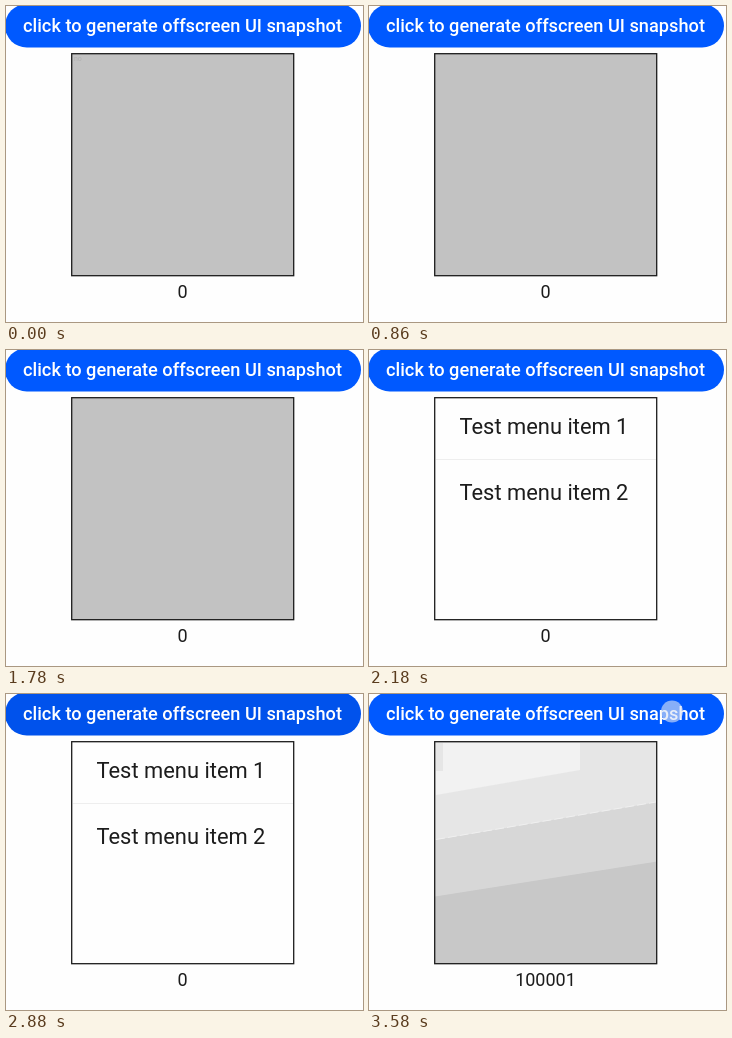
Recreate the animation shown at these times as an HTML page. Size 357 by 316 pixels, loop 4.2 s.

```html
<!DOCTYPE html>
<html lang="en">
<head>
<meta charset="utf-8">
<title>Offscreen snapshot</title>
<style>
  html, body { margin: 0; width: 100%; height: 100%; overflow: hidden; background: #fefefe; }
  svg { display: block; font-family: Roboto, sans-serif; fill: #1c1c1c; }
</style>
</head>
<body>
<svg width="357" height="316" viewBox="0 0 357 316">
  <rect id="button" x="-1" y="-2" width="356" height="43.5" rx="21.75"/>
  <text x="176.5" y="26" font-size="18.2" font-weight="500" text-anchor="middle" fill="#fff">click to generate offscreen UI snapshot</text>

  <g id="blank">
    <rect x="66" y="48" width="222" height="222" fill="#c2c2c2"/>
    <text id="ghost" x="68" y="55" font-size="7" fill="#b0b0b0">no</text>
  </g>
  <g id="menu" font-size="21.9">
    <path d="M67 109.5H287" stroke="#eee"/>
    <text x="90.5" y="83.5">Test menu item 1</text>
    <text x="90.5" y="149.5">Test menu item 2</text>
  </g>
  <g id="shades">
    <path d="M66 48H288V270H66Z" fill="#e6e6e6"/>
    <path d="M74 49H211V76L67 101V77H74Z" fill="#f2f2f2"/>
    <path d="M66 146L288 108V270H66Z" fill="#d7d7d7"/>
    <path d="M67 145.5L287 108" stroke="#f0f0f0" stroke-dasharray="9 3"/>
    <path d="M66 202.500L288 167.500V270H66Z" fill="#c8c8c8"/>
  </g>
  <rect x="65.700" y="47.700" width="222" height="222" fill="none" stroke="#1c1c1c" stroke-width="1.3"/>
  <text id="label" x="176.500" y="292" font-size="18" text-anchor="middle">0</text>
  <circle id="touch" cx="303" cy="17.500" r="11" fill="#dce4f4" opacity=".62"/>
</svg>
<script>
const LOOP = 4200;
const $ = id => document.getElementById(id);
const show = (id, on) => $(id).style.display = on ? '' : 'none';

// Darkness of the button: a soft dip, then two held presses.
function pressure(t) {
  if (t >= 620 && t < 860) return 0.5 * Math.sin(Math.PI * (t - 620) / 240);
  if (t >= 1100 && t < 1460) return 0.5;
  if (t >= 2840 && t < 2920) return t < 2880 ? 0.5 : 1;
  return 0;
}

function draw(now) {
  const t = now % LOOP;
  const p = pressure(t);
  $('button').style.fill = `rgb(0, ${89 - 7 * p}, ${255 - 19 * p})`;
  show('blank', t < 2180);
  show('ghost', t < 620);
  show('menu', t >= 2180 && t < 2920);
  show('shades', t >= 2920);
  show('touch', t >= 3580);
  $('label').textContent = t < 2920 ? '0' : '100001';
  requestAnimationFrame(draw);
}
draw(performance.now());
</script>
</body>
</html>
```
